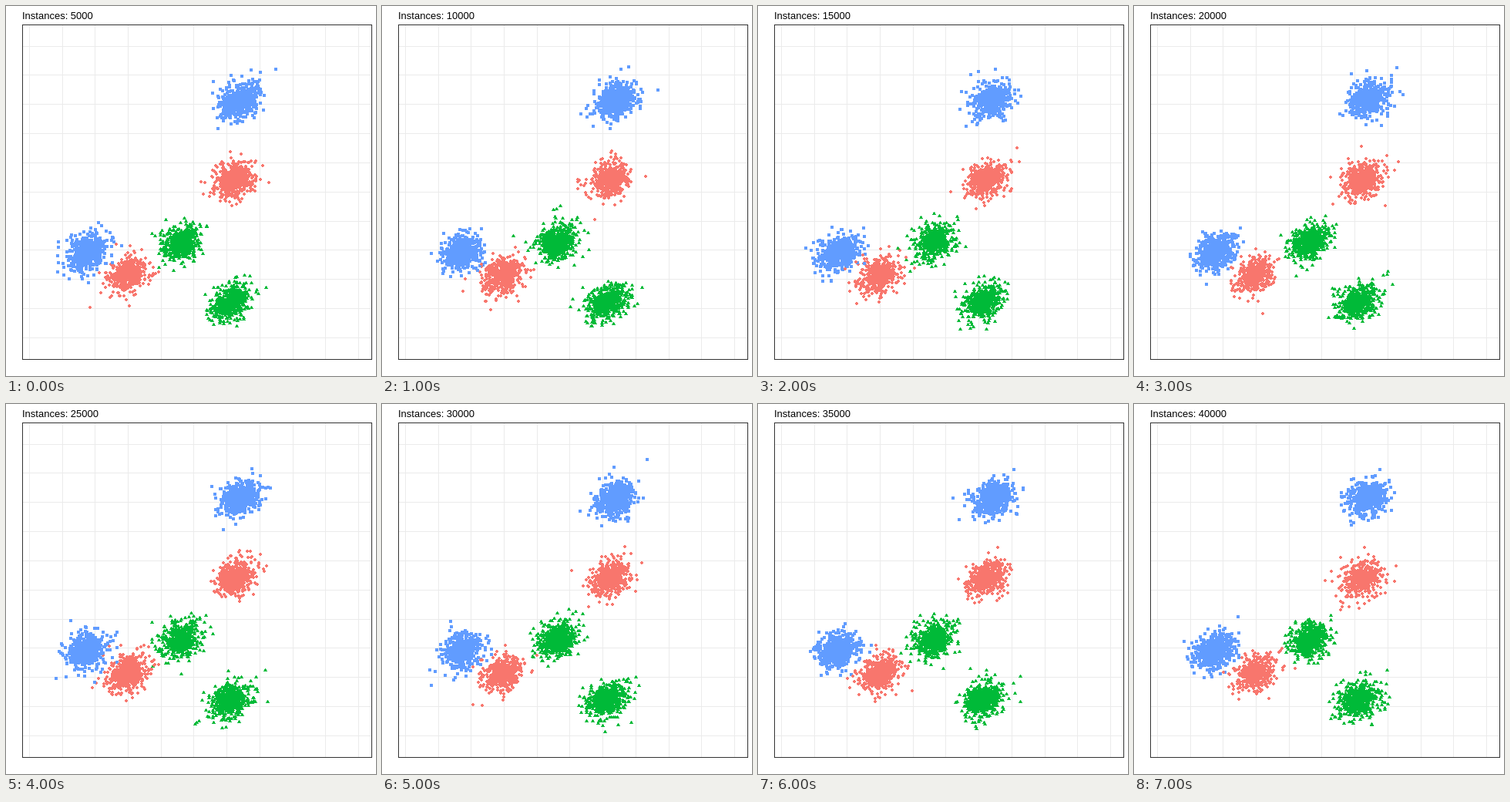
An HTML page with a canvas for the animation above (8 s loop, 480 px wide and 480 px high).

```html
<!DOCTYPE html>
<html lang="en">
<head>
<meta charset="utf-8">
<title>Instances</title>
<style>
  html, body { margin: 0; width: 100%; height: 100%; overflow: hidden; background: #fff; }
  canvas, svg { position: absolute; left: 0; top: 0; width: 480px; height: 480px; }
  text { font: 13px Arial, "Liberation Sans", sans-serif; fill: #000; }
</style>
</head>
<body>
<canvas id="plot" width="480" height="480"></canvas>
<svg viewBox="0 0 480 480"><text id="label" x="21" y="17">Instances: 5000</text></svg>
<script>
const STEP = 1000, STEPS = 8, BATCH = 5000;
const PER_CLUSTER = 580, FALLOFF = 0.6;
const SPREAD_X = 16, SPREAD_Y = 14.5, SLANT = 0.25;

const ctx = document.getElementById('plot').getContext('2d');
const label = document.getElementById('label');

// Markers as pixel rows: [dx, dy, width, height]
const square = { color: '#619CFF', rows: [[-2, -2, 4, 4]] };
const disc = { color: '#F8766D', rows: [[-2, -1, 4, 2], [-1, -2, 2, 4]] };
const triangle = { color: '#00BA38', rows: [[0, -2, 1, 1], [-1, -1, 3, 2], [-2, 1, 5, 1]] };

const clusters = [
  { x: 104, y: 320, mark: square },
  { x: 304, y: 122, mark: square },
  { x: 157, y: 349, mark: disc },
  { x: 296, y: 226, mark: disc },
  { x: 227, y: 306, mark: triangle },
  { x: 291, y: 384, mark: triangle }
];

function randomFrom(seed) {
  return () => {
    seed = (seed + 0x6D2B79F5) | 0;
    let t = Math.imul(seed ^ (seed >>> 15), 1 | seed);
    t = (t + Math.imul(t ^ (t >>> 7), 61 | t)) ^ t;
    return ((t ^ (t >>> 14)) >>> 0) / 4294967296;
  };
}

// Dense core with a loose rim, leaning to the upper right
function scatter(random) {
  const r = Math.pow(-Math.log(1 - random()), FALLOFF);
  const a = random() * 2 * Math.PI;
  const u = r * Math.cos(a), v = r * Math.sin(a);
  return [
    SPREAD_X * u,
    -SPREAD_Y * (SLANT * u + Math.sqrt(1 - SLANT * SLANT) * v)
  ];
}

function drawPanel() {
  ctx.fillStyle = '#fff';
  ctx.fillRect(0, 0, 480, 480);
  ctx.fillStyle = '#EBEBEB';
  for (let i = 0; i < 11; i++) {
    ctx.fillRect(Math.round(30 + i * 42.69), 25, 1, 433);
    ctx.fillRect(22, Math.round(51.6 + i * 37.82), 452, 1);
  }
}

function drawStep(step) {
  const random = randomFrom(step * 7919 + 101);
  drawPanel();
  for (let i = 0; i < PER_CLUSTER; i++) {
    for (const { x, y, mark } of clusters) {
      const [dx, dy] = scatter(random);
      const px = Math.round(x + dx), py = Math.round(y + dy);
      ctx.fillStyle = mark.color;
      for (const [rx, ry, w, h] of mark.rows) ctx.fillRect(px + rx, py + ry, w, h);
    }
  }
  ctx.strokeStyle = '#333';
  ctx.strokeRect(21.5, 24.5, 453, 434);
  label.textContent = 'Instances: ' + (step + 1) * BATCH;
}

let shown = 0;
const start = performance.now();
drawStep(0);

function tick() {
  const step = Math.floor((performance.now() - start) / STEP) % STEPS;
  if (step !== shown) drawStep(shown = step);
  requestAnimationFrame(tick);
}
requestAnimationFrame(tick);
</script>
</body>
</html>
```
